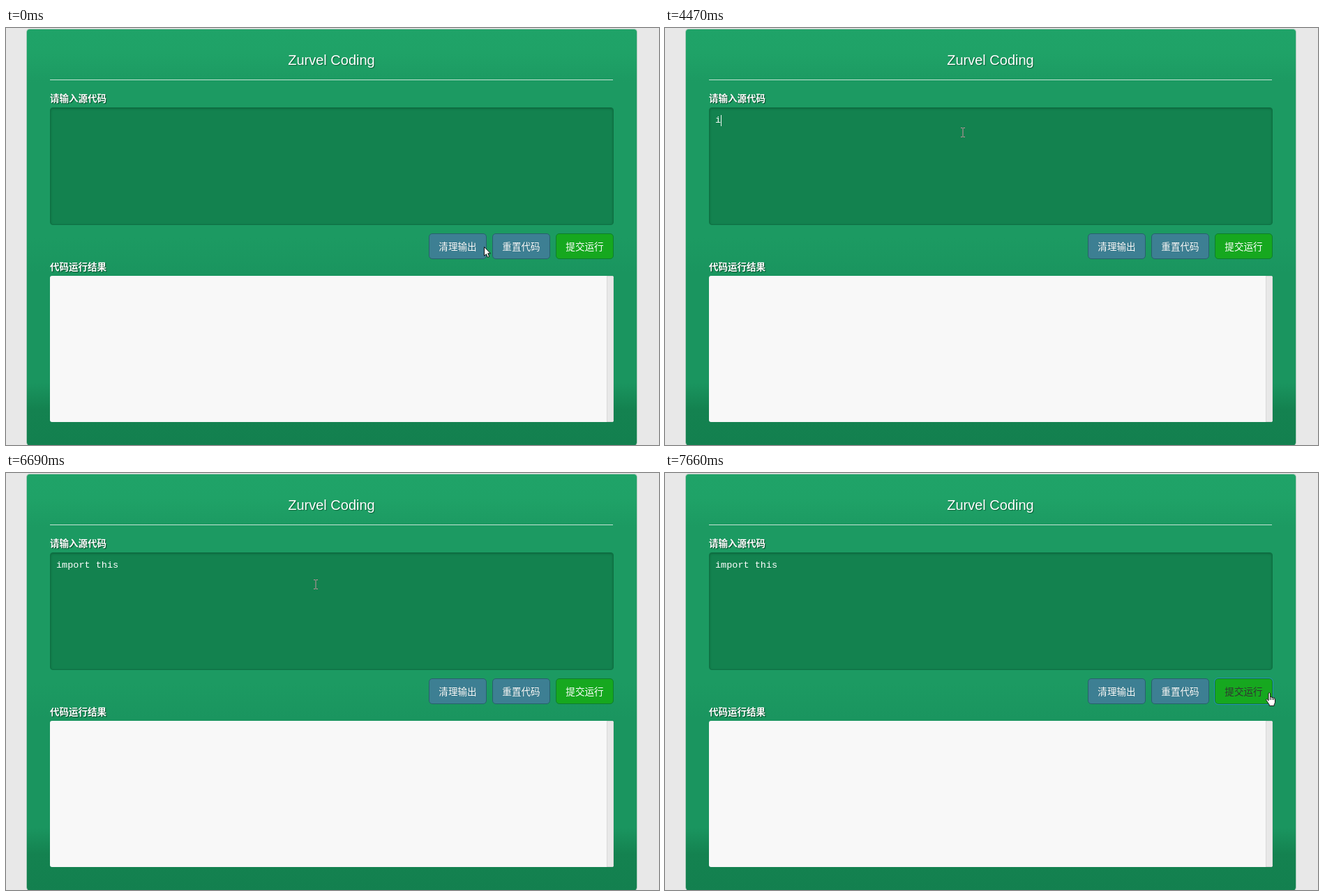
Animation, 936 px wide and 599 px high, one loop 8 s. Source, as an HTML page:

```html
<!DOCTYPE html>
<html lang="zh-CN">
<head>
<meta charset="utf-8">
<title>Online code runner</title>
<style>
html, body { margin: 0; width: 100%; height: 100%; overflow: hidden; background: #e8e8e8; }
#stage { position: absolute; left: 0; top: 0; width: 936px; height: 599px; overflow: hidden;
  background: #e8e8e8; font: 13.6px "Noto Sans CJK SC", "Noto Sans CJK", sans-serif; color: #fff; }
#stage > * { position: absolute; box-sizing: border-box; white-space: pre; }
#panel { left: 29px; top: 1px; width: 876px; height: 599px; border: 1px solid #a9c9b9;
  border-bottom: 0; border-radius: 5px;
  background: linear-gradient(#1fa368 0, #1fa267 35px, #1c9a62 75px, #1c9a62 300px,
    #1a955f 350px, #1a955f 508px, #148250 545px, #13804f 598px); }
#title { left: 63px; top: 34px; width: 807px; text-align: center;
  font: 20px/24px "Liberation Sans", Arial, sans-serif; text-shadow: 1px 1px 1px #0c6239; }
#rule { left: 63px; top: 74px; width: 807px; height: 1px; background: #c6e3d5; }
.label { left: 63px; font-weight: bold; font-size: 13.5px; line-height: 20px; text-shadow: 1px 1px 1px #084a2a; }
#editor { left: 63px; top: 114px; width: 808px; height: 169px; background: #13824f;
  border: 1px solid #0f6f43; border-radius: 4px; box-shadow: inset 0 1px 3px #0c643a; }
#code { left: 72px; top: 124px; font: 13.5px/17px "Liberation Mono", "Courier New", monospace; }
#caret { left: 0; top: 125px; width: 1px; height: 16px; background: #e9f4ee; }
.button { top: 295px; width: 83px; height: 37px; line-height: 35px; text-align: center;
  background: #3d7f93; border: 1px solid #28606c; border-radius: 5px; text-shadow: 0 0 1px #28606c; }
#run { background: #16a81f; border-color: #0e7d2d; text-shadow: none; }
#run.hover { color: #333; }
#run.focus { outline: 1px solid #2790b4; }
#output { left: 63px; top: 356px; width: 808px; height: 210px; background: #f8f8f8;
  border-radius: 3px; overflow: hidden; }
#output::after { content: ""; position: absolute; right: 0; top: 0; width: 10px; height: 100%;
  box-sizing: border-box; background: #e8e8e8; border: 1px solid #d9d9d9; }
#pointer { left: 0; top: 0; }
</style>
</head>
<body>
<div id="stage">
  <div id="panel"></div>
  <div id="title">Zurvel Coding</div>
  <div id="rule"></div>
  <div class="label" style="top:90px">请输入源代码</div>
  <div id="editor"></div>
  <div id="code"></div>
  <div id="caret"></div>
  <div class="button" style="left:606px">清理输出</div>
  <div class="button" style="left:697px">重置代码</div>
  <div class="button" id="run" style="left:788px">提交运行</div>
  <div class="label" style="top:332px">代码运行结果</div>
  <div id="output"></div>
  <svg id="pointer" width="936" height="599">
    <g id="arrow" fill="#fff" stroke="#111" stroke-width="1" stroke-linejoin="round">
      <path d="M.5 .5V13.4L3.4 10.7L5.4 15.4L7.7 14.4L5.7 9.8H9.4Z"/>
    </g>
    <g id="beam" fill="none" stroke="#c8929e" stroke-width="1">
      <path d="M0 .5H2.5M3.5 .5H6M0 13.5H2.5M3.5 13.5H6M3 1V13"/>
    </g>
    <g id="hand" fill="#fff" stroke="#111" stroke-width="1" stroke-linejoin="round">
      <path d="M4 12V2Q4 .6 5.3 .6T6.6 2V7.4Q6.9 6.4 8 6.6T9.2 8Q9.5 7.1 10.5 7.4T11.5 8.8Q12 8 12.8 8.4T13.5 9.8V14Q13.4 16 12.2 17.4V19.4H5.2V17.8Q3.7 16 2.4 13.6L.8 11.2Q.4 10 1.4 9.8T3 10.6Z"/>
      <path d="M6.6 7.4V11M9.2 8V11M11.5 8.8V11" fill="none"/>
    </g>
  </svg>
</div>
<script>
const LOOP = 8000;
const SOURCE = "import this";
const CHAR_WIDTH = 8.1;

const keyTimes = [4470, 4610, 4740, 5020, 5270, 5390, 5550, 5700, 5860, 5990, 6140];

// [start, visible]
const caretSteps = [
  [0, false], [2530, true], [3080, false], [3660, true], [4070, false],
  [4470, true], [6690, false], [7220, true], [7660, false]
];

// [start, shape, x, y]
const pointerSteps = [
  [0, "arrow", 685, 314], [150, "beam", 528, 236], [300, "beam", 424, 143],
  [6690, "beam", 441, 153], [6830, "beam", 594, 228], [6950, "arrow", 821, 296],
  [7070, "hand", 845, 307], [7220, "hand", 861, 315]
];

const get = id => document.getElementById(id);
const [code, caret, run] = ["code", "caret", "run"].map(get);
const pointers = ["arrow", "beam", "hand"].map(get);
const stepAt = (steps, t) => steps.findLast(step => step[0] <= t);

function render(t) {
  const typed = keyTimes.filter(k => k <= t).length;
  code.textContent = SOURCE.slice(0, typed);

  caret.style.visibility = stepAt(caretSteps, t)[1] ? "visible" : "hidden";
  caret.style.left = Math.round(72.1 + typed * CHAR_WIDTH) + "px";

  const [, shape, x, y] = stepAt(pointerSteps, t);
  for (const p of pointers) p.style.display = p.id === shape ? "inline" : "none";
  get(shape).setAttribute("transform", `translate(${x} ${y})`);

  run.classList.toggle("hover", t >= 7070);
  run.classList.toggle("focus", t >= 7660);
}

const start = performance.now();
function tick() {
  render((performance.now() - start) % LOOP);
  requestAnimationFrame(tick);
}
tick();
</script>
</body>
</html>
```
